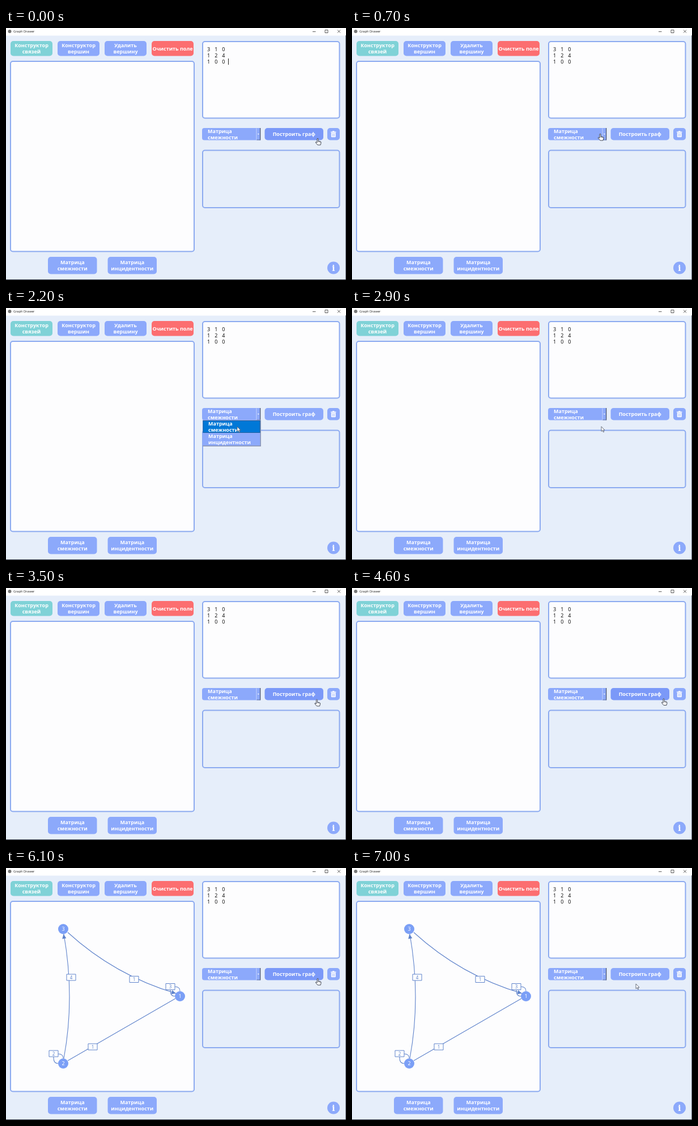
An HTML page with a canvas for the animation above (7.1 s loop, 600 px wide and 446 px high).

```html
<!DOCTYPE html>
<html lang="ru">
<head>
<meta charset="utf-8">
<title>Graph Drawer</title>
<style>
html, body { margin: 0; width: 100%; height: 100%; overflow: hidden; background: #e6eefa; }
canvas { display: block; }
</style>
</head>
<body>
<canvas id="stage" width="600" height="446"></canvas>
<script>
const ctx = document.getElementById('stage').getContext('2d');
const LOOP = 7100, STEP = 100;
const BLUE = '#8ca9fb', HOVER = '#7b99f8', BORDER = '#8caaf0', EDGE = '#5f83cb', NODE = '#7b9ff6';
const BOLD = 'bold 9px "Open Sans", "Noto Sans", sans-serif';
const PLAIN = '9px "Noto Sans", "Open Sans", sans-serif';

const POPUP_OPEN = 900, POPUP_CLOSE = 2900, GRAPH_AT = 4700, CARET_OFF = 400;

// Pointer tip: time, x, y
const pointerPath = [
  [0, 550, 195], [300, 550, 195], [700, 438, 187], [800, 437, 188], [1000, 437, 188],
  [1100, 434, 196], [1400, 416, 217], [1700, 412, 243], [1800, 411, 243], [1900, 410, 237],
  [2200, 408, 210], [2500, 408, 210], [2700, 425, 211], [2800, 425, 211], [3200, 485, 206],
  [3500, 548.5, 197], [3600, 549, 196], [4500, 549, 196], [4800, 552, 194.5],
  [5200, 552.5, 194], [5400, 551.5, 194], [5700, 551.5, 194], [6400, 549, 196],
  [6500, 549, 199.5], [7000, 501, 205], [LOOP, 501, 205]
];

function pointerAt(t) {
  const i = pointerPath.findIndex(p => p[0] > t);
  const [t0, x0, y0] = pointerPath[i - 1], [t1, x1, y1] = pointerPath[i];
  const k = (t - t0) / (t1 - t0);
  return { x: x0 + (x1 - x0) * k, y: y0 + (y1 - y0) * k };
}

function box(x, y, w, h, r, fill, stroke, width = 2) {
  ctx.beginPath();
  ctx.roundRect(x, y, w, h, r);
  if (fill) { ctx.fillStyle = fill; ctx.fill(); }
  if (stroke) { ctx.strokeStyle = stroke; ctx.lineWidth = width; ctx.stroke(); }
}

function rect(x, y, w, h, fill) {
  ctx.fillStyle = fill;
  ctx.fillRect(x, y, w, h);
}

function text(str, x, y, color = '#fff', font = BOLD, align = 'center') {
  ctx.font = font;
  ctx.textAlign = align;
  ctx.fillStyle = color;
  ctx.fillText(str, x, y);
}

function line(d, color, width = 1) {
  ctx.strokeStyle = color;
  ctx.lineWidth = width;
  ctx.stroke(new Path2D(d));
}

function button(x, y, w, h, label, fill = BLUE) {
  box(x, y, w, h, 5, fill);
  const rows = label.split('\n');
  rows.forEach((row, i) => text(row, x + w / 2, y + h / 2 + 3.5 + (i - (rows.length - 1) / 2) * 11));
}

function titleBar() {
  rect(0, 0, 600, 13.5, '#fff');
  ctx.fillStyle = '#777';
  ctx.beginPath();
  ctx.arc(6.5, 6, 3, 0, 7);
  ctx.fill();
  text('Graph Drawer', 13, 8.3, '#222', '5.7px "Open Sans", sans-serif', 'left');
  line('M541 6.5h5.5M563 3.5h5v5h-5zM585 3.5l5 5M590 3.5l-5 5', '#333', 0.8);
}

function combo() {
  box(346, 177, 103, 21.5, [4, 0, 0, 4], BLUE);
  text('Матрица', 356, 186, '#fff', BOLD, 'left');
  text('смежности', 356, 197, '#fff', BOLD, 'left');
  rect(441.5, 177.5, 1, 20.5, '#c3d2fb');
  rect(448, 177, 1.3, 21.5, '#4d5874');
  rect(442.5, 197.5, 6.5, 1, '#6b7ba6');
  ctx.fillStyle = '#fff';
  ctx.fill(new Path2D('M443.8 187h3.2l-1.6 1.8z'));
}

function popup(second) {
  rect(347, 198.5, 103, 46.5, '#8f98b2');
  rect(347, 198.5, 101.5, 45, BLUE);
  const y = second ? 221 : 199;
  rect(347.5, y, 101, 22, '#0078d7');
  ctx.strokeStyle = '#285a91';
  ctx.lineWidth = 0.8;
  ctx.strokeRect(348, y + 0.5, 100, 21);
  ['Матрица', 'смежности', 'Матрица', 'инцидентности'].forEach((row, i) =>
    text(row, 357, 208 + 11 * i, '#fff', BOLD, 'left'));
}

function trashButton() {
  box(567, 177, 22, 21.5, 5, BLUE);
  rect(573, 183.5, 9.5, 1.4, '#fff');
  rect(576, 182.3, 3.5, 1.5, '#fff');
  box(573.8, 185.5, 8, 7.8, [0, 0, 1.3, 1.3], '#fff');
  line('M575.9 187v4.8M577.8 187v4.8M579.7 187v4.8', BLUE, 0.7);
}

function infoButton() {
  ctx.fillStyle = BLUE;
  ctx.beginPath();
  ctx.arc(578, 424.5, 11, 0, 7);
  ctx.fill();
  text('i', 578, 429.5, '#fff', 'bold 14px "DejaVu Serif", serif');
}

function arrowHead(x, y, angle) {
  ctx.save();
  ctx.translate(x, y);
  ctx.rotate(angle);
  ctx.fillStyle = EDGE;
  ctx.fill(new Path2D('M0 0L-8 -3.6V3.6Z'));
  ctx.restore();
}

function edgeLabel(value, x, y) {
  box(x - 8, y - 5.5, 16, 11, 0, '#fff', EDGE, 1);
  text(value, x, y + 3, EDGE, '8px "Noto Sans", sans-serif');
}

function graph() {
  line('M109 114Q192 190 300 222M102 337Q122 230 102 117M299 231L109 341', EDGE, 1.1);
  arrowHead(300, 222, Math.atan2(32, 108));
  arrowHead(101.5, 117, -Math.PI / 2 - 0.16);
  const nodes = [[307, 227], [101, 346], [101, 108]];
  nodes.slice(0, 2).forEach(([x, y]) =>
    line(`M${x} ${y - 9}Q${x} ${y - 17} ${x - 9} ${y - 17}H${x - 17}V${y - 10}Q${x - 17} ${y} ${x - 9} ${y}`, EDGE, 1.1));
  edgeLabel(1, 226, 197);
  edgeLabel(4, 115, 193.5);
  edgeLabel(1, 153, 316.5);
  edgeLabel(3, 290, 210);
  edgeLabel(2, 84, 328.5);
  nodes.forEach(([x, y], i) => {
    ctx.fillStyle = NODE;
    ctx.beginPath();
    ctx.arc(x, y, 9, 0, 7);
    ctx.fill();
    text(i + 1, x, y + 3.2, '#fff', PLAIN);
  });
}

const HAND = new Path2D('M-1 1Q0 -.5 1 1V5L5 6Q6.3 6.4 6 8L5 12H0L-3.4 8Q-4 6.4 -2.6 6.7L-1 8Z');
const ARROW = new Path2D('M0 0V8.6L2 6.8L3.5 10L4.8 9.4L3.4 6.3H6Z');

function pointer({ x, y }, hand) {
  const shape = hand ? HAND : ARROW;
  ctx.save();
  ctx.translate(x, y);
  ctx.fillStyle = '#fff';
  ctx.fill(shape);
  ctx.strokeStyle = hand ? '#303644' : '#596071';
  ctx.lineWidth = 0.9;
  ctx.lineJoin = 'round';
  ctx.stroke(shape);
  if (hand) line('M1 5V7M2.8 5.7V7.3M4.5 6.2V7.6', '#303644', 0.6);
  ctx.restore();
}

function draw(t) {
  const tip = pointerAt(t);
  const open = t >= POPUP_OPEN && t < POPUP_CLOSE;
  const inRow = tip.y > 177 && tip.y < 199;
  const onBuild = inRow && tip.x > 456 && tip.x < 560;
  const onCombo = inRow && tip.x > 346 && tip.x < 450;

  rect(0, 0, 600, 446, '#e6eefa');
  titleBar();

  button(8, 23, 74, 26.5, 'Конструктор\nсвязей', '#7fd2d7');
  button(91, 23, 74, 26.5, 'Конструктор\nвершин');
  button(174, 23, 74, 26.5, 'Удалить\nвершину');
  button(257, 23, 74, 26.5, 'Очистить поле', '#fc6e70');

  box(8, 59, 324, 336.5, 4, '#fdfdfe', BORDER);
  box(347, 24, 241.5, 135.5, 4, '#fdfdfe', BORDER);
  box(347, 216.5, 241.5, 101.5, 4, '#e6eefa', BORDER);

  ['310', '124', '100'].forEach((row, r) => [...row].forEach((digit, c) =>
    text(digit, 357.5 + 13.2 * c, 41 + 11 * r, '#111', PLAIN)));
  if (t < CARET_OFF) rect(392, 54, 1, 11, '#222');

  combo();
  button(456.5, 177, 103.5, 21.5, 'Построить граф', onBuild ? HOVER : BLUE);
  trashButton();
  button(74, 405, 86.5, 30.5, 'Матрица\nсмежности');
  button(179.5, 405, 86.5, 30.5, 'Матрица\nинцидентности');
  infoButton();

  if (t >= GRAPH_AT) graph();
  if (open) popup(tip.y > 221);

  rect(599, 13, 1, 433, '#6c7280');
  rect(0, 445, 600, 1, '#2b3140');
  pointer(tip, onBuild || (onCombo && !open));
}

function tick(now) {
  draw(Math.floor((now % LOOP) / STEP) * STEP);
  requestAnimationFrame(tick);
}
draw(0);
requestAnimationFrame(tick);
</script>
</body>
</html>
```
